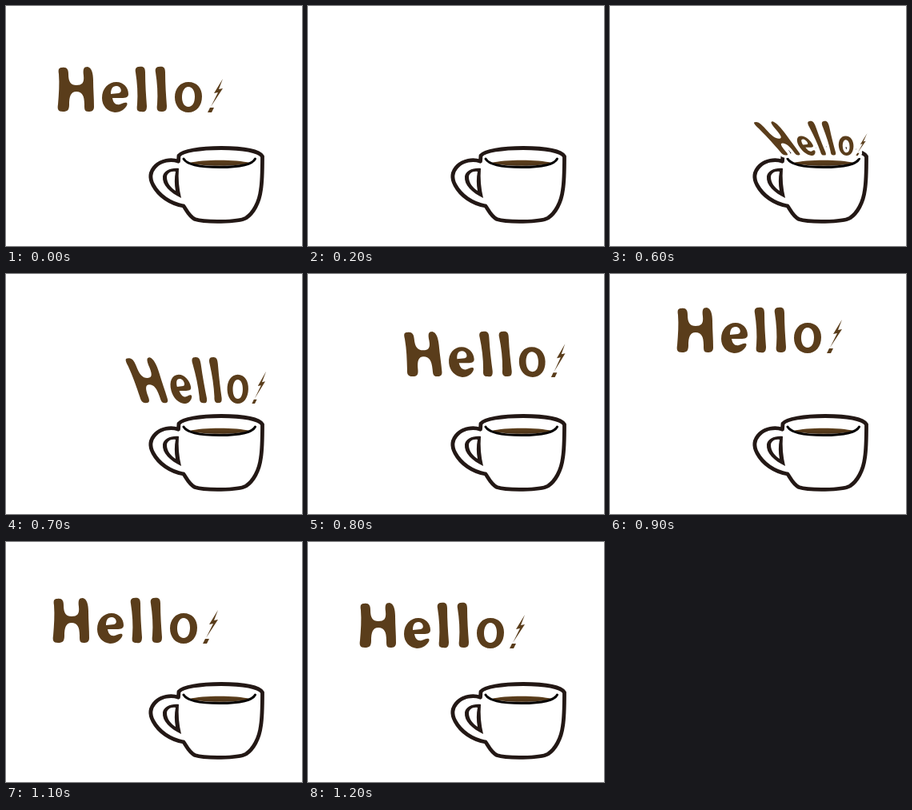
Recreate the animation shown at these times as an HTML page. Size 370 px wide and 300 px high, loop 1.5 s.

```html
<!DOCTYPE html>
<html lang="en">
<head>
<meta charset="utf-8">
<title>Hello coffee</title>
<style>
  html, body { margin: 0; width: 100%; height: 100%; overflow: hidden; background: #fff; }
  svg { display: block; width: 370px; height: 300px; }
  .line { fill: none; stroke: #231815; stroke-width: 4.8; stroke-linejoin: round; stroke-linecap: round; }
  .ink { fill: #231815; }
  .white { fill: #fff; }
  .front { stroke: #050303; stroke-width: 3; }
  #word { fill: #5a3d1b; fill-rule: evenodd; stroke: #fff; stroke-width: 7; stroke-linejoin: round; paint-order: stroke; }
</style>
</head>
<body>
<svg viewBox="0 0 370 300" role="img" aria-label="Hello! above a cup of coffee">
  <defs>
    <linearGradient id="coffee" x1="0" y1="0" x2="0" y2="1">
      <stop offset="0" stop-color="#5f411e"/>
      <stop offset="1" stop-color="#4b3217"/>
    </linearGradient>
  </defs>
  <!-- handle, then the body, open on the left -->
  <path class="line white" d="M215 194C206 191 194 193 187 200C180 207 179 215 184 224C191 237 205 247 222 250"/>
  <path class="line white" d="M215.500 194L216 187C221 181 242 177.500 269 177.500C296 177.500 316 181 320.500 188C320.500 205 320.500 218 318.500 230C316.500 246 309 259 300 265C290 270.500 248 270.500 236 266.500C229 263 226 256 222 250"/>
  <path class="ink" d="M216 203C206 202 197 206 196 213C195 224 205 233 219 240C216 228 215 215 216 203Z"/>
  <path class="white" d="M212 207C205 206 201 210 201 214C201 221 206 227 212 231C210.500 223 210.500 215 212 207Z"/>
  <path fill="url(#coffee)" d="M229 196C246 191.500 288 191.500 305 196C292 201 242 201 229 196Z"/>
  <path class="line front" d="M222 191C226 198 243 201.500 267 201.500C291 201.500 308 198 311.500 191"/>
  <path id="word"/>
</svg>
<script>
  const STEP = 100, LOOP = 1500;
  const BOX = { x: 64, y: 75, w: 208, h: 58 };

  // Lettering at rest; every coordinate pair passes through the warp.
  const LETTERS = [
    'M70 77C76 76 78 79 78 85C78 95 81 99 88 99C95 99 98 96 97 87C96 79 97 76 102 76C107 77 109 84 109 93C109 104 110 115 110 126C110 131 107 132 103 132C98 132 98 129 98 123C98 112 95 107 88 107C81 107 79 113 79 123C79 130 77 132 71 132C65 132 64 129 65 123C66 110 67 98 66 85C65 79 66 77 70 77Z',
    'M138 95C147 95 153 102 153 110C153 114 150 115 144 115L133 115C134 121 137 124 142 123C146 122 148 120 151 121C153 123 149 128 146 130C143 132 140 133 136 133C127 132 120 125 120 115C120 103 128 95 138 95Z',
    'M138 100C133 100 131 104 131 110L141 109C146 108 144 100 138 100Z',
    'M166 76C172 75 174 77 174 83C174 98 175 112 176 125C176 131 174 133 169 132C164 132 163 130 164 123C165 109 164 96 162 83C161 78 163 76 166 76Z',
    'M191 76C197 75 199 77 199 83C199 98 200 112 201 125C201 131 199 132 194 132C189 132 188 129 189 123C190 109 189 96 187 83C186 78 188 76 191 76Z',
    'M228 95C239 95 245 103 245 113C245 125 238 133 228 133C218 133 211 125 211 114C211 103 218 95 228 95Z',
    'M228 101C223 101 220 107 220 114C220 121 223 126 228 126C233 126 236 121 236 113C236 106 233 101 228 101Z',
    'M271 91L260 109L265 108L256 126L271 103L266 104Z',
    'M252 133L255 127L260 127L257 133Z'
  ].join('');

  const flat = (x, y) => [x, x + BOX.w, y, x, x + BOX.w, y + BOX.h, 0];
  const rest = flat(64, 75);

  // Per step: top left x, top right x, top y, bottom left x, bottom right x, bottom y, bow
  const POSES = [
    rest, rest,
    null,
    [234, 303, 188, 252, 294, 194, 1],
    [208, 315, 180, 239, 304, 192, 3],
    [192, 321, 162, 228, 311, 190, 2],
    [175, 325, 143, 217, 317, 187, 0],
    [146, 328, 103, 170, 322, 162, 0],
    [118, 322, 71, 124, 323, 129, 0],
    flat(83, 41),
    flat(52, 62),
    flat(58, 69),
    rest, rest, rest
  ];

  // Perspective: the wider edge is nearer, so that side is taller too.
  function warp([tl, tr, top, bl, br, bottom, bow]) {
    const depth = (tr - tl) / (br - bl);
    return LETTERS.replace(/(\d+) (\d+)/g, (_, x, y) => {
      const u = (x - BOX.x) / BOX.w, t = (y - BOX.y) / BOX.h;
      const v = t * depth / (1 + (depth - 1) * t);
      const upper = tl + (tr - tl) * u, lower = bl + (br - bl) * u;
      const px = upper + (lower - upper) * v;
      const py = top + (bottom - top) * v - 4 * bow * u * (1 - u) * (1 - v);
      return px.toFixed(2) + ' ' + py.toFixed(2);
    });
  }

  const word = document.getElementById('word');
  const shapes = POSES.map(pose => pose ? warp(pose) : '');
  const start = performance.now();
  let shown = -1;

  function draw() {
    const step = Math.floor((performance.now() - start) % LOOP / STEP);
    if (step !== shown) word.setAttribute('d', shapes[shown = step]);
    requestAnimationFrame(draw);
  }
  draw();
</script>
</body>
</html>
```
